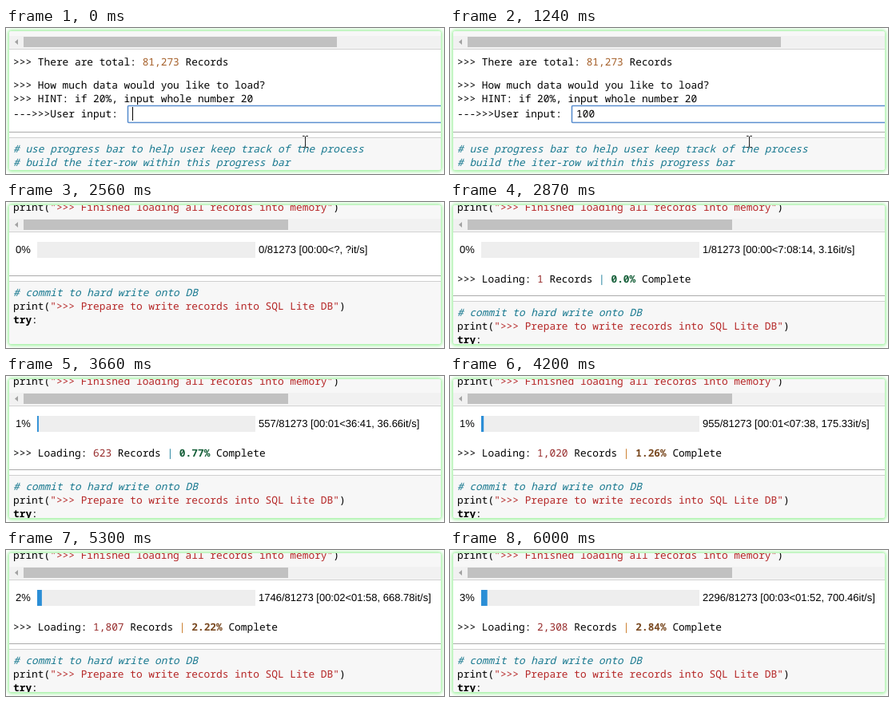
Write an HTML page that moves like this. It is 548 by 183 pixels and loops after 6080 ms.

```html
<!DOCTYPE html>
<html>
<head>
<meta charset="utf-8">
<style>
html, body { margin: 0; width: 100%; height: 100%; overflow: hidden; background: #fff; }
svg { display: block; }
text { white-space: pre; text-rendering: geometricPrecision; fill: #000; }
.mono { font: 12.83px "Noto Sans Mono", monospace; }
.sans { font: 13px "Liberation Sans", Arial, sans-serif; }
.note { font-style: italic; fill: #17788f; }
.str { fill: #b52626; }
.m { font-weight: 500; }
.b { font-weight: bold; }
</style>
</head>
<body>
<svg width="548" height="183" viewBox="0 0 548 183">
  <defs>
    <clipPath id="pane"><rect x="4" y="4" width="540" height="174" rx="3"/></clipPath>
    <filter id="blur" x="-5%" y="-10%" width="110%" height="120%"><feGaussianBlur stdDeviation="2"/></filter>
  </defs>
  <rect x="2.5" y="2.5" width="543" height="177.5" rx="4" fill="#9bf09b" filter="url(#blur)"/>
  <rect x="4" y="4" width="540" height="174" rx="3" fill="#fff"/>
  <g id="view" clip-path="url(#pane)"></g>
</svg>
<script>
const LOOP = 6080, TOTAL = 81273;
const LOAD_START = 2870, STEP = 78.25;
const view = document.getElementById('view');

const rect = (x, y, w, h, fill, more = '') =>
  `<rect x="${x}" y="${y}" width="${w}" height="${h}" fill="${fill}" ${more}/>`;
const text = (x, y, s, cls = 'mono') => `<text x="${x}" y="${y}" class="${cls}">${s}</text>`;
const tint = (s, color, cls = '') => `<tspan class="${cls}" style="fill:${color}">${s}</tspan>`;
const str = s => `<tspan class="str">"${s}"</tspan>`;
const esc = s => s.replace(/</g, '&lt;');
const pad = n => String(n).padStart(2, '0');
const comma = n => n.toLocaleString('en-US');

// Linear interpolation through [x, y] points
function lerp(points, x) {
  let i = 1;
  while (i < points.length - 1 && x > points[i][0]) i++;
  const [x0, y0] = points[i - 1], [x1, y1] = points[i];
  return y0 + (y1 - y0) * (x - x0) / (x1 - x0);
}

function clock(s) {
  s = Math.floor(s);
  const h = Math.floor(s / 3600);
  return (h ? h + ':' : '') + pad(Math.floor(s / 60) % 60) + ':' + pad(s % 60);
}

// Lower end of a code cell with its horizontal scrollbar
function cellEnd(y, thumb) {
  return rect(4, 4, 540, y + 17 - 4, '#f7f7f7') +
    rect(4, y, 540, 15, '#f1f1f1') +
    rect(22, y + 1, thumb, 13, '#c1c1c1') +
    `<path d="M15 ${y + 4}v7l-4-3.5z" fill="#a3a3a3"/>` +
    rect(4, y + 16, 540, 1, '#cfcfcf');
}

// Divider and top of the next code cell
const cellStart = y => rect(4, y, 540, 1, '#ababab') +
  rect(4, y + 7, 540, 90, '#f7f7f7') + rect(4, y + 7, 540, 1, '#cfcfcf');

function promptScene(t) {
  const total = tint('81,273', t < 1470 ? '#a5602a' : '#94301f', 'm');
  const sent = t >= 1940;
  const lines = [
    `>>> There are total: ${total} Records`,
    '>>> How much data would you like to load?',
    '>>> HINT: if 20%, input whole number 20',
    '--->>>User input: ' + (sent ? '100' : '')
  ];
  if (sent) lines.push(`>>> Preparing to load ${total} (100%) Records`);
  const rows = sent ? [47, 64, 81, 98, 115] : [47, 76, 93, 112];
  let out = cellEnd(10, 392) + lines.map((s, i) => text(9, rows[i], s)).join('');
  if (!sent) {
    const typed = [460, 770, 930].filter(k => t >= k).length;
    out += rect(152.5, 97.5, 400, 21, '#fff', 'rx="1" stroke="#5b8fcf" stroke-width="1.6"') +
      text(158, 112, '100'.slice(0, typed));
    if (t < 1240 || t >= 1780) out += rect(Math.floor(158.3 + typed * 7.7), 99, 1, 17, '#000');
  }
  return out + cellStart(130) +
    text(9, 156, '# use progress bar to help user keep track of the process', 'mono note') +
    text(9, 173, '# build the iter-row within this progress bar', 'mono note') +
    '<path d="M371 135.5h2.5l1 1l1-1h2.5M374.5 136v13M371 149.5h2.5l1-1l1 1h2.5" fill="none" stroke="#222"/>';
}

function loadScene(n) {
  const idle = n < 0;
  const k = Math.floor(n * 0.74);   // bar refreshes, slower than the text
  const done = idle ? 0 : Math.round(lerp([[0, 1], [7, 557], [17, 1353], [29, 2296]], k));
  let stats = '00:00<?, ?it/s', status = '';
  if (!idle) {
    // Smoothed seconds per item, decaying from a slow first one
    const decay = 0.7 ** k;
    const pace = lerp([[0, 1352.3], [7, 1352.3], [17, 1339.8], [29, 1417.5]], k) / 1e6;
    const each = 0.316155 * decay + pace * (1 - decay);
    stats = `${clock(0.316 + n * STEP / 1000)}<${clock((TOTAL - done) * each)}, ${(1 / each).toFixed(2)}it/s`;

    const loaded = Math.round(lerp([[0, 1], [10, 623], [23, 1361], [40, 2308]], n));
    let pct = String(Math.round(loaded / TOTAL * 1e4) / 100);
    if (!pct.includes('.')) pct += '.0';
    const early = n < 16;
    status = '>>> Loading: ' + tint(comma(loaded), '#962a2a') + ' Records ' +
      tint('|', early ? '#1d7f9c' : '#c8741e') + ' ' +
      tint(pct + '%', early ? '#17603a' : '#7a4a22', 'b') + ' Complete';
  }
  const shift = idle ? -25 : 0;
  const width = done / TOTAL * 273;
  return cellEnd(21, 331) +
    text(9, 10.5, `print(${str('>>> Finished loading all records into memory')})`) +
    text(12, 64, Math.round(done / TOTAL * 100) + '%', 'sans') +
    rect(39, 50, 273, 20, '#eee') + rect(39, 50, width, 20, '#2b8ed6') +
    text(316, 64, esc(`${done}/${TOTAL} [${stats}]`), 'sans') +
    text(9, 101, status) +
    cellStart(117 + shift) +
    text(9, 143 + shift, '# commit to hard write onto DB', 'mono note') +
    text(9, 160 + shift, `print(${str('>>> Prepare to write records into SQL Lite DB')})`) +
    text(9, 177 + shift, '<tspan class="b">try</tspan>:');
}

let shown = '';
function draw(now) {
  const t = now % LOOP;
  const n = t < LOAD_START ? -1 : Math.min(40, Math.floor((t - LOAD_START) / STEP + 0.06));
  const next = t < 2560 ? promptScene(t) : loadScene(n);
  if (next !== shown) view.innerHTML = shown = next;
}

let start;
function tick(now) {
  start ??= now;
  draw(now - start);
  requestAnimationFrame(tick);
}
draw(0);
requestAnimationFrame(tick);
</script>
</body>
</html>
```
